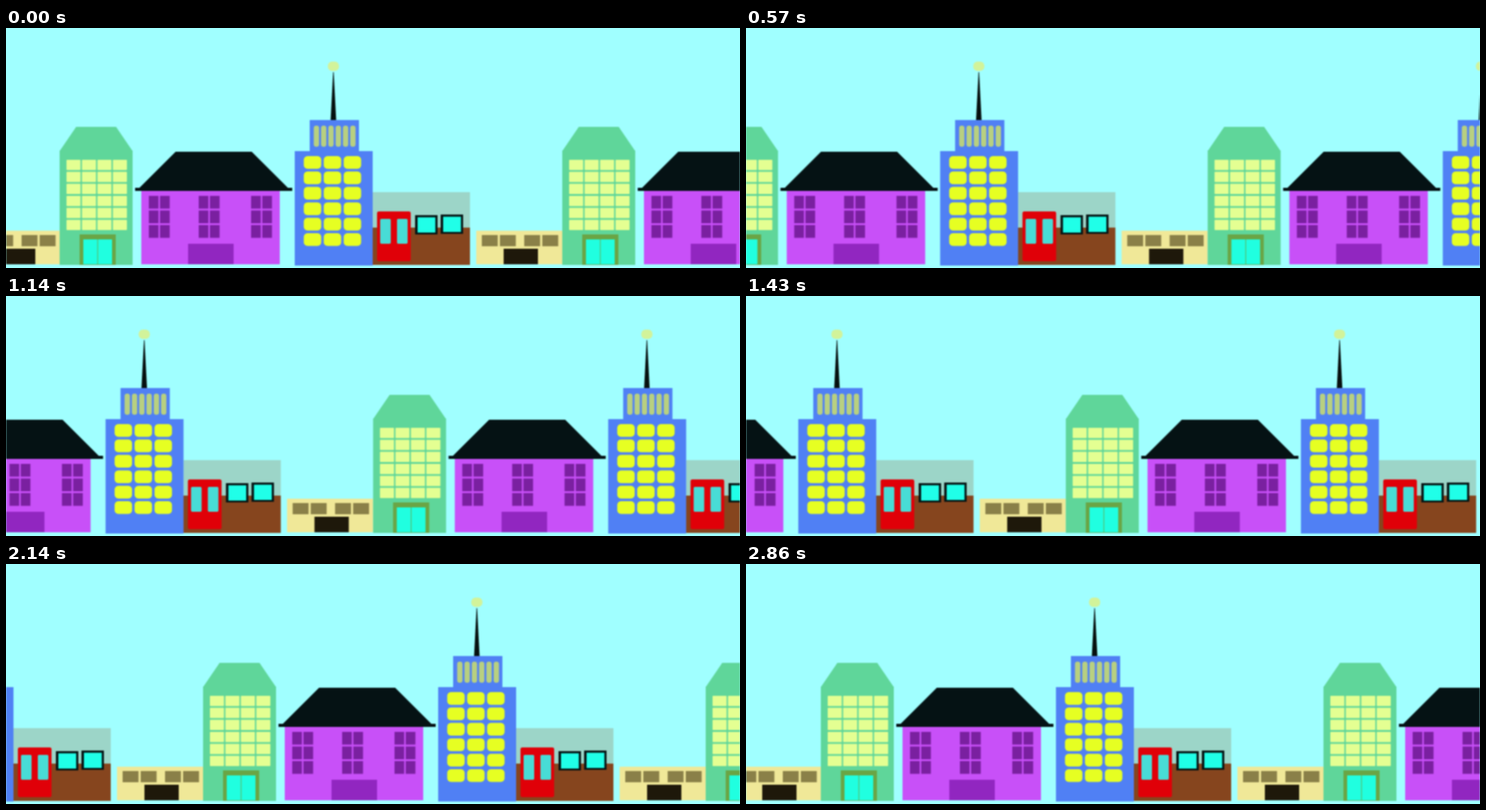
Recreate the animation shown at these times as an HTML page with a canvas. Size 1177x386 px, loop 3.01 s.

```html
<!DOCTYPE html>
<html lang="en">
<head>
<meta charset="utf-8">
<title>Scrolling town</title>
<style>
html, body { margin: 0; width: 100%; height: 100%; overflow: hidden; background: #a0ffff; }
canvas { display: block; filter: blur(.8px); }
</style>
</head>
<body>
<canvas id="stage" width="1177" height="386"></canvas>
<script>
const ctx = document.getElementById('stage').getContext('2d');
const LOOP = 3010, STEPS = 21, PERIOD = 806, GROUND = 381;
// [step, distance scrolled]; steady speed in between
const scroll = [[0, 0], [12, 455], [15, 576], [18, 691], [20, 772]];

function box(color, x, y, w, h, radius = 0) {
  ctx.fillStyle = color;
  ctx.beginPath();
  ctx.roundRect(x, y, w, h, radius);
  ctx.fill();
}

// Symmetric shape centred on x, standing on the line y
function taper(color, x, y, topWidth, bottomWidth, height) {
  ctx.fillStyle = color;
  ctx.beginPath();
  ctx.moveTo(x - bottomWidth / 2, y);
  ctx.lineTo(x - topWidth / 2, y - height);
  ctx.lineTo(x + topWidth / 2, y - height);
  ctx.lineTo(x + bottomWidth / 2, y);
  ctx.fill();
}

function grid(color, x, y, w, h, cols, rows, dx, dy, radius) {
  for (let r = 0; r < rows; r++)
    for (let c = 0; c < cols; c++) box(color, x + c * dx, y + r * dy, w, h, radius);
}

function greenBlock() {
  const green = '#5fd69a';
  taper(green, 144.5, 198, 64, 117, 39);
  box(green, 86, 197, 117, GROUND - 197);
  grid('#e4ff92', 97, 212, 22.5, 16.5, 4, 6, 24.8, 19.3, 1);
  box('#6aa545', 118, 332, 58, GROUND - 332);
  grid('#20ffe0', 124, 340, 22.5, 40, 2, 1, 23.5, 0);
}

function house() {
  box('#c850f8', 217, 261, 222, GROUND - 262);
  taper('#051214', 333, 258, 122, 240, 59);
  box('#051214', 207, 257, 252, 5);
  for (const x of [229, 309, 393]) grid('#7a20a0', x, 270, 15.5, 20.5, 2, 3, 18, 23.5);
  box('#9126c0', 292, 347, 73, GROUND - 348);
}

function tower() {
  const blue = '#5080f4';
  taper('#06100f', 525, 149, 1, 9, 78);
  box('#d2f39a', 516, 54, 18, 15, 7);
  box(blue, 487, 148, 79, 51);
  box(blue, 463, 198, 125, GROUND - 197);
  grid('#b8d080', 493.5, 157, 8.5, 34, 6, 1, 11.7, 0, 4);
  grid('#e6ff22', 477.5, 206, 28, 20.5, 3, 6, 32, 24.8, 6);
}

function shop() {
  box('#9cd5c8', 588, 264, 156, 58);
  box('#86451e', 587, 321, 157, GROUND - 321);
  box('#e00008', 595, 295, 54, 80, 3);
  grid('#48dcd6', 600, 307, 17, 40, 2, 1, 27, 0, 2);
  for (let i = 0; i < 2; i++) {
    const x = 656 + 41 * i, y = 301 - i;
    box('#061414', x, y, 36, 31);
    box('#20ffe8', x + 4, y + 3.5, 28.5, 24.5);
  }
}

function lowShed() {
  box('#f0e898', 754, 326, 138, GROUND - 327);
  for (const x of [763, 831]) grid('#8a8048', x, 333, 25.5, 18, 2, 1, 29, 0);
  box('#1e180a', 798, 355, 55, GROUND - 356);
}

function scrolled(step) {
  const i = Math.max(1, scroll.findIndex(([s]) => s >= step));
  const [s0, d0] = scroll[i - 1], [s1, d1] = scroll[i];
  return d0 + (d1 - d0) * (step - s0) / (s1 - s0);
}

function draw(now) {
  // seven steps per second, on 10 ms ticks
  const tick = Math.floor(now % LOOP / 10);
  const step = Math.min(STEPS - 1, Math.floor((tick + 0.5) * 7 / 100));
  const distance = scrolled(step);
  box('#a0ffff', 0, 0, 1177, 386);
  for (let copy = -1; copy <= 2; copy++) {
    ctx.save();
    ctx.translate(copy * PERIOD - distance, 0);
    for (const building of [lowShed, greenBlock, house, shop, tower]) building();
    ctx.restore();
  }
}

let start;
function play(now) {
  start ??= now;
  draw(now - start);
  requestAnimationFrame(play);
}
draw(0);
requestAnimationFrame(play);
</script>
</body>
</html>
```
